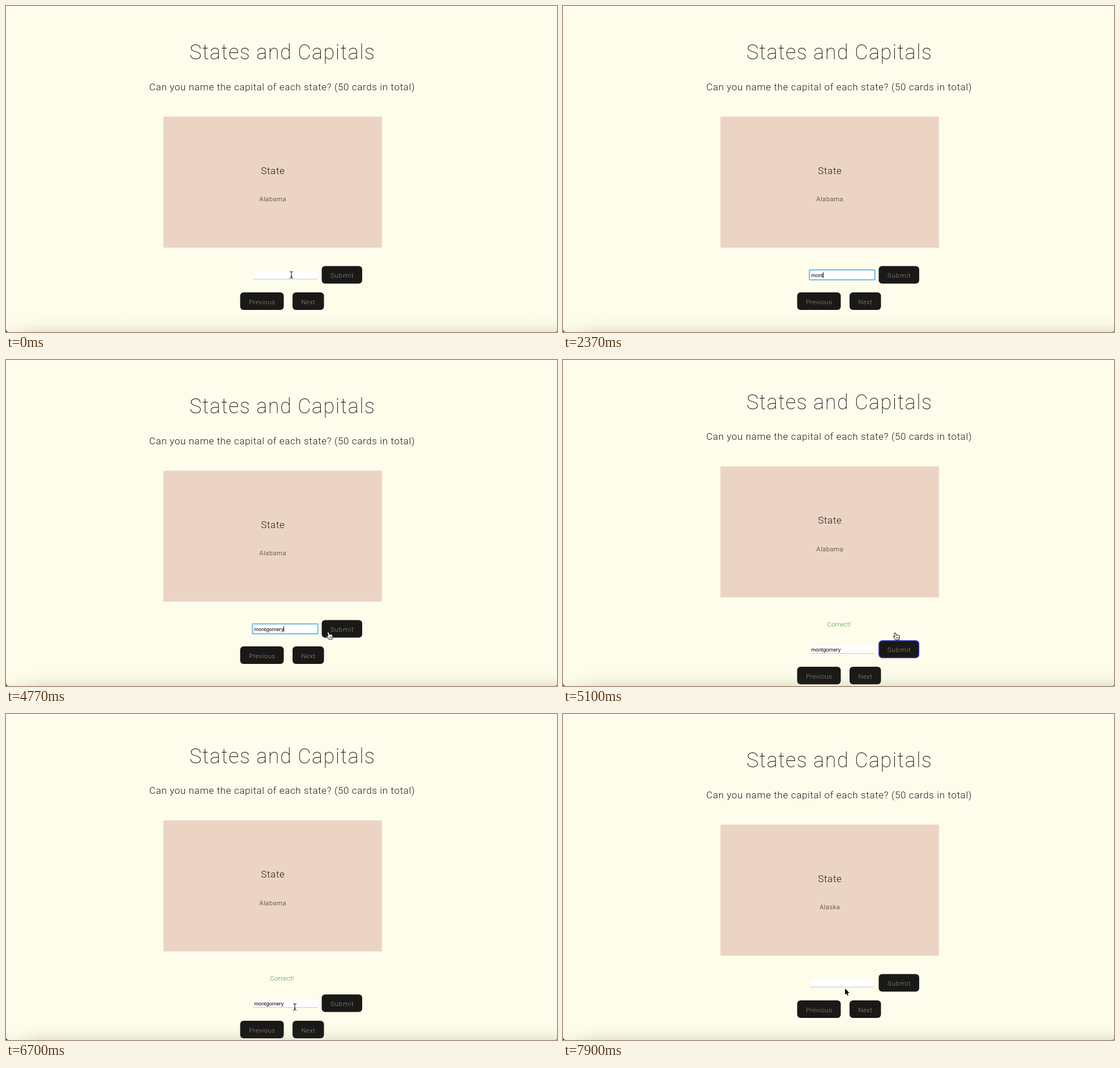
Recreate the animation shown at these times as an HTML page with a canvas. Size 973 by 576 pixels, loop 7970 ms.

```html
<!DOCTYPE html>
<html lang="en">
<head>
<meta charset="utf-8">
<title>States and Capitals</title>
<style>
  html, body { margin: 0; width: 100%; height: 100%; overflow: hidden; background: #fefdeb; }
  canvas { display: block; width: 973px; height: 576px; }
</style>
</head>
<body>
<canvas id="stage" width="973" height="576"></canvas>
<script>
const ctx = document.getElementById('stage').getContext('2d');
const W = 973, H = 576, LOOP = 7970;
const LIGHT = 'Roboto, sans-serif', FIELD = '"Liberation Sans", Arial, sans-serif';

const FOCUS = 470, PRESS = 4960, ANSWER = 5030, NEXT_PRESS = 6990, NEXT_CARD = 7060;

// [time, text in the field]
const typing = [
  [0, ''], [1830, 'm'], [2030, 'mo'], [2230, 'mon'], [2370, 'mont'],
  [2530, 'montg'], [2600, 'montgo'], [2700, 'montgom'], [2770, 'montgome'],
  [2970, 'montgomer'], [3030, 'montgomert'], [3130, 'montgomerty'],
  [3430, 'montgomert'], [3570, 'montgomer'], [3730, 'montgomery'], [NEXT_CARD, '']
];

// [time, x, y, pointer kind from here on]
const path = [
  [0, 504, 475, 'beam'], [1830, 504, 475, 'none'], [4400, 504, 475, 'beam'],
  [4640, 553, 479, 'arrow'], [4700, 560, 480, 'hand'], [4900, 587, 482, 'hand'],
  [5200, 587, 482, 'arrow'], [5630, 587, 482, 'arrow'], [6030, 514, 520, 'arrow'],
  [6370, 514, 520, 'arrow'], [6420, 511, 516, 'beam'], [6500, 510, 517.5, 'beam'],
  [6730, 510, 517.5, 'beam'], [6790, 516, 527, 'arrow'], [6860, 527, 543, 'hand'],
  [6960, 539, 554, 'hand'], [7100, 539, 554, 'arrow'], [7160, 539, 554, 'arrow'],
  [7300, 531, 536, 'hand'], [7470, 516, 520, 'hand'], [7640, 510, 505, 'arrow'],
  [7900, 498, 485, 'arrow'], [LOOP, 498, 485, 'arrow']
];

const clamp = v => Math.max(0, Math.min(1, v));
const last = (list, t) => list.findLastIndex(k => k[0] <= t);

function text(str, x, y, size, color, { spacing = 0, weight = 300, family = LIGHT, align = 'center' } = {}) {
  ctx.font = `${weight} ${size}px ${family}`;
  ctx.letterSpacing = spacing + 'px';
  ctx.textAlign = align;
  ctx.fillStyle = color;
  ctx.fillText(str, x + spacing / 2, y);
  return ctx.measureText(str).width;
}

function box(x, y, w, h, r, color) {
  ctx.fillStyle = color;
  ctx.beginPath();
  ctx.roundRect(x, y, w, h, r);
  ctx.fill();
}

function button(label, x, y, w, size, spacing, ring) {
  box(x, y, w, 31, 6, '#191918');
  if (ring > 0) {
    ctx.strokeStyle = `rgba(58, 58, 225, ${ring})`;
    ctx.lineWidth = 1.4;
    ctx.beginPath();
    ctx.roundRect(x + .5, y + .5, w - 1, 30, 6);
    ctx.stroke();
  }
  text(label, x + w / 2, y + 20.5, size, '#a58c73', { spacing });
}

function field(t, y, value) {
  const focused = t >= FOCUS && t < PRESS;
  if (focused) {
    box(434, y - 2, 118, 20, 2.5, '#85c3ee');
    box(436.5, y + .5, 113, 15, 0, '#fff');
  } else {
    box(436, y, 114, 16, 0, '#f3f3ec');
    box(436.5, y + .5, 113, 15, 0, '#fefeff');
    box(436, y + 15, 114, 1, 0, '#c9c9c5');
  }
  const w = value ? text(value, 438.3, y + 12, 9.4, '#000', { weight: 400, family: FIELD, align: 'left' }) : 0;
  if (focused && (t < 1000 || t >= 1500)) box(Math.round(438.3 + w), y + 3.5, 1, 10, 0, '#000');
}

function outline(points, close = true) {
  ctx.beginPath();
  points.forEach(([x, y]) => ctx.lineTo(x, y));
  if (close) ctx.closePath();
}

const pointers = {
  none() {},
  arrow() {
    outline([[0, 0], [0, 11], [2.5, 8.7], [4.2, 12.6], [6, 11.8], [4.4, 8], [7.8, 8]]);
    ctx.lineWidth = 1.6;
    ctx.strokeStyle = '#fff';
    ctx.stroke();
    ctx.fillStyle = '#000';
    ctx.fill();
  },
  beam() {
    ctx.beginPath();
    ctx.moveTo(-3, -6);
    ctx.quadraticCurveTo(0, -6, 0, -4);
    ctx.quadraticCurveTo(0, -6, 3, -6);
    ctx.moveTo(0, -4.5);
    ctx.lineTo(0, 4.5);
    ctx.moveTo(-3, 6);
    ctx.quadraticCurveTo(0, 6, 0, 4);
    ctx.quadraticCurveTo(0, 6, 3, 6);
    ctx.moveTo(-1.5, 2.5);
    ctx.lineTo(1.5, 2.5);
    for (const [w, c] of [[2.2, 'rgba(255,255,255,.75)'], [1, '#111']]) {
      ctx.lineWidth = w;
      ctx.strokeStyle = c;
      ctx.stroke();
    }
  },
  hand() {
    outline([[-1, 0], [.3, .2], [1.6, 4.4], [3, 3.8], [4, 4.5], [5.3, 4.1], [6, 5], [7, 5.2],
      [7.4, 8], [6.5, 10.4], [6.4, 12.6], [.2, 12.6], [-1.2, 10], [-3.8, 7.2], [-3.2, 6], [-.8, 7.4], [-2, 1.2]]);
    ctx.lineJoin = 'round';
    ctx.fillStyle = '#fff';
    ctx.fill();
    ctx.lineWidth = 1;
    ctx.strokeStyle = '#111';
    ctx.stroke();
    ctx.lineWidth = .7;
    for (const x of [1.6, 3.3, 5]) {
      outline([[x, 7.5], [x + .2, 10.4]], false);
      ctx.stroke();
    }
  }
};

function pointer(t) {
  const i = last(path, t);
  const [t0, x0, y0, kind] = path[i];
  const [t1, x1, y1] = path[i + 1];
  const p = (t - t0) / (t1 - t0);
  ctx.save();
  ctx.translate(x0 + (x1 - x0) * p, y0 + (y1 - y0) * p);
  pointers[kind]();
  ctx.restore();
}

function corner(x, r) {
  ctx.fillStyle = '#333';
  ctx.beginPath();
  ctx.moveTo(x, H - Math.abs(r));
  ctx.quadraticCurveTo(x, H, x + r, H);
  ctx.lineTo(x, H);
  ctx.fill();
}

function windowEdge() {
  const shade = ctx.createLinearGradient(0, 546, 0, H);
  shade.addColorStop(0, 'rgba(70,70,50,0)');
  shade.addColorStop(.5, 'rgba(70,70,50,.025)');
  shade.addColorStop(1, 'rgba(70,70,50,.12)');
  ctx.fillStyle = shade;
  ctx.fillRect(0, 546, W, 30);
  const fade = ctx.createLinearGradient(0, 0, 60, 0);
  fade.addColorStop(0, 'rgba(254,253,235,.8)');
  fade.addColorStop(1, 'rgba(254,253,235,0)');
  ctx.fillStyle = fade;
  ctx.fillRect(0, 546, 60, 30);
  corner(0, 6);
  corner(W, -3);
}

// Focus ring that comes up on press and fades after release
const ring = (t, press, release) => t < press ? 0 : clamp((t - press) / 80) * clamp(1 - (t - release) / 140);

function draw(t) {
  ctx.fillStyle = '#fefdeb';
  ctx.fillRect(0, 0, W, H);

  const answered = t >= ANSWER && t < NEXT_CARD;
  const up = answered ? -7.5 : 0, down = answered ? 36 : 0;

  text('States and Capitals', 487.5, 94 + up, 36, '#000', { spacing: 1.5, weight: 200 });
  text('Can you name the capital of each state? (50 cards in total)', 487.3, 148.5 + up, 17, '#1c1c1a', { spacing: .64 });
  box(278, 195.5 + up, 386, 231.5, 0, '#ecd4c5');
  text('State', 471, 296.5 + up, 17, '#1c1a18', { spacing: .7 });
  text(t < NEXT_CARD ? 'Alabama' : 'Alaska', 471, 345 + up, 11.3, '#2c2825', { spacing: .55 });
  if (answered) text('Correct!', 487.3, 470.5, 11.3, '#3f9445', { spacing: .45 });

  field(t, 467 + down, typing[last(typing, t)][1]);
  button('Submit', 557.5, 459.5 + down, 71.5, 11.8, .8, ring(t, PRESS, 5140));
  button('Previous', 413.5, 506 + down, 77, 11.3, .45, 0);
  button('Next', 506, 506 + down, 55.5, 11.3, .45, ring(t, NEXT_PRESS, 7100));

  windowEdge();
  pointer(t);
}

function tick() {
  draw(performance.now() % LOOP);
  requestAnimationFrame(tick);
}
tick();
</script>
</body>
</html>
```
